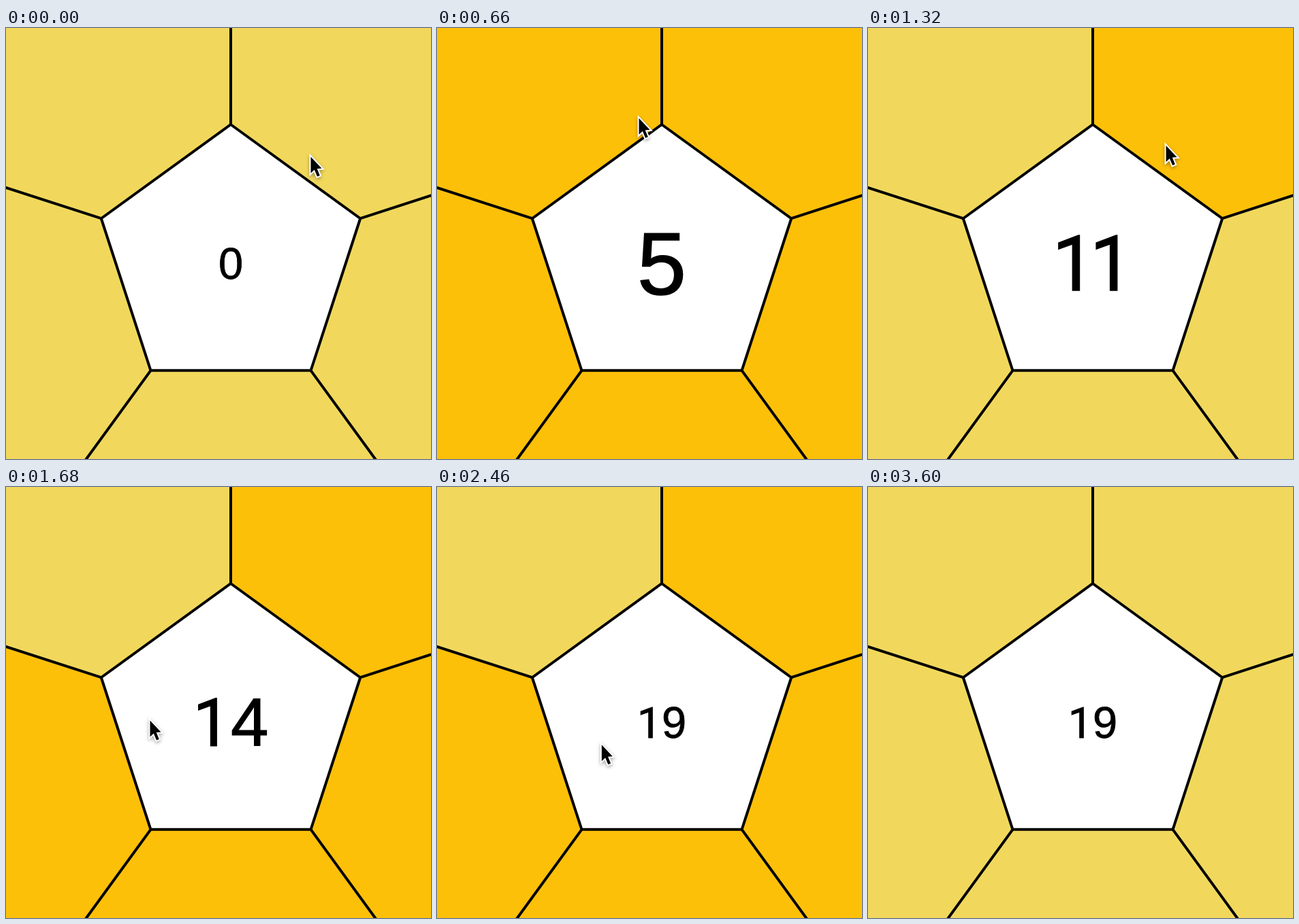
An HTML page with a canvas for the animation above (3.66 s loop, 624 px wide and 634 px high).

```html
<!DOCTYPE html>
<html>
<head>
<meta charset="utf-8">
<style>
  html, body { margin: 0; width: 100%; height: 100%; overflow: hidden; background: #fff; }
  canvas { display: block; }
</style>
</head>
<body>
<canvas id="stage" width="624" height="634"></canvas>
<script>
const ctx = document.getElementById('stage').getContext('2d');
const LOOP = 3660, STEP = 60, POP = 255, LEAVE = 2760;
const CX = 330, CY = 342, RADIUS = 200, FAR = 900;
const PALE = '#f1d85c', LIT = '#fdc009';

// The pointer circles the pentagon: time, petals counted, petals turned from the top, distance
const keys = [
  [0, 0.7, 0.51, 194],
  [660, 5.02, 4.87, 215],
  [1320, 11.57, 10.44, 202],
  [1680, 14.98, 13.76, 120],
  [2040, 17.95, 16.23, 199],
  [2460, 19.9, 18.46, 96],
  [LEAVE, 19.95, 21, 330]
];

// Point at a distance from the centre, turned clockwise by a number of petals
function polar(turn, distance) {
  const a = (turn * 72 - 90) * Math.PI / 180;
  return [CX + distance * Math.cos(a), CY + distance * Math.sin(a)];
}

function trace(points) {
  ctx.beginPath();
  points.forEach(p => ctx.lineTo(...p));
  ctx.closePath();
}

function stateAt(time) {
  const t = Math.min(time, LEAVE - 1);
  const i = keys.findIndex(k => k[0] > t);
  const from = keys[i - 1], to = keys[i];
  const k = (t - from[0]) / (to[0] - from[0]);
  const [, tally, turn, distance] = from.map((v, j) => v + (to[j] - v) * k);
  const rate = (to[1] - from[1]) / (to[0] - from[0]);
  const count = Math.floor(tally);
  const age = (tally - count) / rate;
  return { count, turn, distance, scale: count ? 1 + Math.max(0, 1 - age / POP) : 1 };
}

function drawPetals(lit) {
  for (let i = 0; i < 5; i++) {
    trace([[CX, CY], polar(i, FAR), polar(i + 1, FAR)]);
    ctx.fillStyle = i < lit ? LIT : PALE;
    ctx.fill();
  }
  ctx.strokeStyle = '#000';
  ctx.lineWidth = 4;
  for (let i = 0; i < 5; i++) {
    trace([polar(i, RADIUS), polar(i, FAR)]);
    ctx.stroke();
  }
  trace([0, 1, 2, 3, 4].map(i => polar(i, RADIUS)));
  ctx.fillStyle = '#fff';
  ctx.fill();
  ctx.stroke();
}

// Roboto has a "1" without a foot; pairs of ones sit closer together
function drawCount(count, scale) {
  const size = 65 * scale, digits = String(count);
  const advance = size * (digits === '11' ? 0.482 : 0.556);
  const left = CX - (advance * (digits.length - 1) + size * 0.556) / 2;
  ctx.fillStyle = ctx.strokeStyle = '#000';
  ctx.lineWidth = size * 0.012;
  [...digits].forEach((digit, i) => {
    ctx.font = digit === '1' ? `${size * 0.98}px Roboto, sans-serif`
      : `${size}px "Liberation Sans", Arial, sans-serif`;
    const at = [digit, left + i * advance, 347 + 0.344 * size];
    ctx.fillText(...at);
    ctx.strokeText(...at);
  });
}

function drawPointer(x, y) {
  ctx.save();
  ctx.translate(x + 1.5, y + 3);
  trace([[0, 0], [0, 24], [5.3, 19], [9.5, 29], [13.3, 27.4], [9.2, 17.5], [16, 17]]);
  ctx.shadowColor = 'rgba(0,0,0,.35)';
  ctx.shadowBlur = 5;
  ctx.shadowOffsetY = 2;
  ctx.strokeStyle = '#fff';
  ctx.lineWidth = 4;
  ctx.stroke();
  ctx.shadowColor = 'transparent';
  ctx.fillStyle = '#000';
  ctx.fill();
  ctx.restore();
}

function frame() {
  const t = Math.floor(performance.now() % LOOP / STEP) * STEP;
  const { count, turn, distance, scale } = stateAt(t);
  const inside = t < LEAVE;
  drawPetals(inside && count ? (count - 1) % 5 + 1 : 0);
  drawCount(count, scale);
  if (inside) drawPointer(...polar(turn, distance));
  requestAnimationFrame(frame);
}
frame();
</script>
</body>
</html>
```
